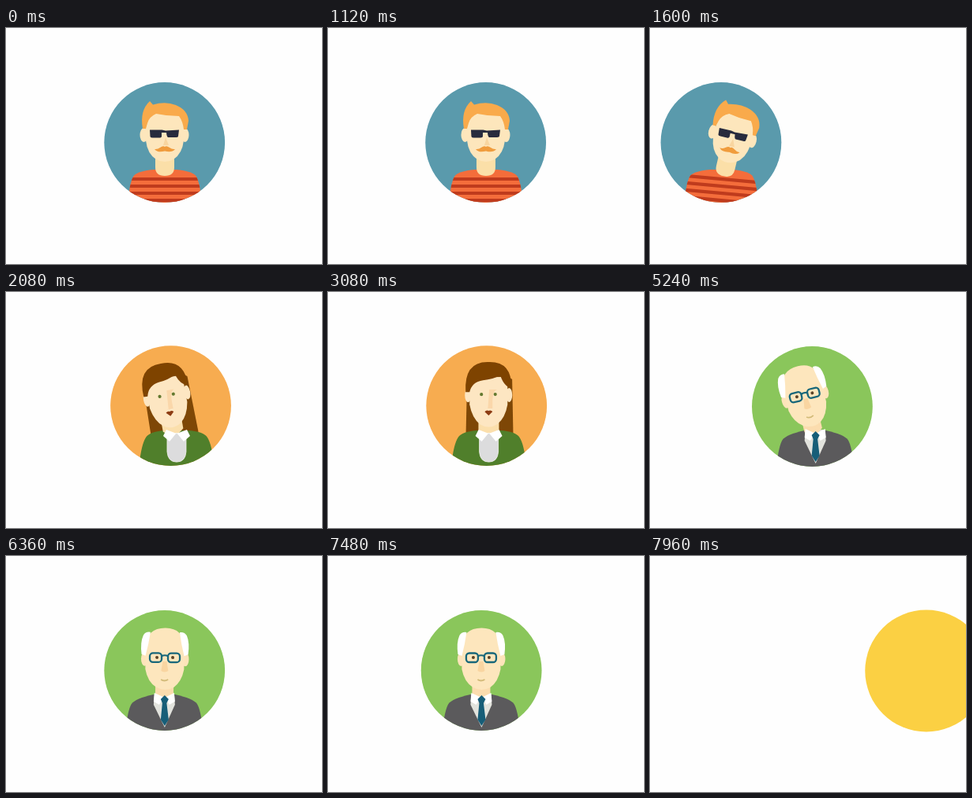
An HTML page that plays this animation: 400 by 300 pixels, repeating every 8 s.

```html
<!DOCTYPE html>
<html lang="en">
<head>
<meta charset="utf-8">
<title>Portraits</title>
<style>
  html, body { margin: 0; width: 100%; height: 100%; overflow: hidden; background: #fefefe; }
  svg { display: block; width: 100vw; height: 100vh; }
</style>
</head>
<body>
<svg viewBox="0 0 400 300" xmlns="http://www.w3.org/2000/svg">
  <defs>
    <clipPath id="disc"><circle cx="200.7" cy="145.5" r="76.4"/></clipPath>
    <clipPath id="shirt"><path d="M187 180Q165 182 161 189Q156 198 154 225H248Q246 198 241 189Q237 182 215 180Z"/></clipPath>
  </defs>

  <g class="card" data-lean="13" data-pivot="201" clip-path="url(#disc)">
    <circle cx="200.7" cy="145.5" r="77" fill="#5a9aac"/>
    <g class="person">
      <g clip-path="url(#shirt)">
        <rect x="140" y="175" width="120" height="60" fill="#f46d3b"/>
        <path class="stripes" d="M130 192H270M130 201H270M130 210H270M130 219H270" stroke="#bf3b1d" stroke-width="4.2"/>
      </g>
      <g class="head">
        <path d="M189 160H213V177Q213 188 201 188Q189 188 189 177Z" fill="#fbdfa8"/>
        <ellipse cx="174.500" cy="136" rx="5" ry="9" fill="#fde6bc"/>
        <ellipse cx="226.500" cy="136" rx="5" ry="9" fill="#fde6bc"/>
        <path d="M177 106H225V143Q223 160 212 167Q201 173 190 167Q179 160 177 143Z" fill="#fde6bc"/>
        <path d="M173 128Q169 105 182 93L186 97.500Q202 93 215 98Q230 104 231 118L229 129H225Q224 119 219 112Q204 112 190 109Q181 113 179 121L177 128Z" fill="#f9aa4b"/>
        <path d="M202 139L206 149H199" fill="#f8d59f"/>
        <path d="M182 129.500H197.500L202 130.500L219 129.500L218 137.500Q218 139 215 139H205.500Q203.500 139 203 133H197V137.500Q197 139.500 194 139.500H185.500Q183 139.500 182.500 138Z" fill="#272b3d"/>
        <path d="M188 154Q192 154.500 195 152Q199 149 201 151Q203 149 207 152Q210 154.500 214 154Q210 159 201 156.500Q192 159 188 154Z" fill="#f09c3d"/>
      </g>
    </g>
  </g>

  <g class="card" data-lean="11" data-pivot="200" data-y="-0.9" clip-path="url(#disc)">
    <circle cx="200.7" cy="145.5" r="77" fill="#f7ac50"/>
    <g class="person" data-x="2.5">
      <g class="head">
        <path d="M174 112Q201 88 231 112L232 184H172Z" fill="#7e4706"/>
      </g>
      <path d="M187 177Q167 178 162 186Q156 195 153 226H249Q246 195 240 186Q235 178 215 177Z" fill="#507f2b"/>
      <g class="head">
        <path d="M188 158H214V176L201 186L188 176Z" fill="#fbdfac"/>
        <ellipse cx="175" cy="132" rx="4" ry="9" fill="#fde6c2"/>
        <ellipse cx="227" cy="132" rx="4" ry="9" fill="#fde6c2"/>
        <path d="M177 109H225V144Q222 161 212 169Q201 176 190 169Q180 161 177 144Z" fill="#fde6c2"/>
        <path d="M202 125H212Q206 126 206 141V149H200" fill="#fad7aa"/>
        <path d="M172 128Q170 89 201 90Q231 89 230 123Q221 122 216 107Q207 112 194 113Q180 115 177 128Z" fill="#7e4300"/>
        <circle cx="192" cy="131" r="2.100" fill="#63792f"/>
        <circle cx="209.500" cy="131" r="2.100" fill="#63792f"/>
        <path d="M196 153Q198.500 150.500 201 152Q203.500 150.500 206 153L201 158Z" fill="#8d3c13"/>
      </g>
      <path d="M189 184Q201 177 213 184V204Q212 217 201 217Q190 217 189 204Z" fill="#dcdcdd" stroke="#f1f1ee" stroke-width="0.800"/>
      <path d="M188 176L201 181L214 176L218 184L210 191L201 180L192 191L184 184Z" fill="#fff"/>
    </g>
  </g>

  <g class="card" data-lean="14" data-pivot="185" clip-path="url(#disc)">
    <circle cx="200.7" cy="145.5" r="77" fill="#8ac65b"/>
    <g class="person">
      <path d="M187 176Q164 181 159 188Q154 196 151 225H250Q247 196 242 188Q237 181 214 176Z" fill="#5b5a5c"/>
      <path d="M188 175H213L214 189L201 218L187 189Z" fill="#e2e3dd"/>
      <g class="head">
        <path d="M189 158H212V175L201 183L189 175Z" fill="#fbdcae"/>
        <ellipse cx="175" cy="131" rx="4.500" ry="9" fill="#fde4ba"/>
        <ellipse cx="226.500" cy="131" rx="4.500" ry="9" fill="#fde4ba"/>
        <path d="M176 116Q177 91.500 201 91.500Q224 91.500 225 116V144Q222 160 212 167Q201 173 190 167Q179 160 176 144Z" fill="#fde6bd"/>
        <path d="M182 97Q176 96 173 101Q169 110 171 125L176 127Q180 112 182 97ZM219 97Q225 96 228 101Q232 110 230 125L225 127Q221 112 219 97Z" fill="#fff"/>
        <path d="M198 134H203L205 146Q201 149 196 146Z" fill="#f9d5a1"/>
        <circle cx="190.500" cy="129" r="2" fill="#5b4327"/>
        <circle cx="210.500" cy="129" r="2" fill="#5b4327"/>
        <path d="M196 127.500Q200.500 125 205 127.500" fill="none" stroke="#17677a" stroke-width="2.200"/>
        <rect x="181.500" y="123.500" width="15" height="11.500" rx="4" fill="none" stroke="#17677a" stroke-width="2.300"/>
        <rect x="204.500" y="123.500" width="15" height="11.500" rx="4" fill="none" stroke="#17677a" stroke-width="2.300"/>
        <path d="M196 157Q200 160 205 157" fill="none" stroke="#d2ba78" stroke-width="1.800"/>
      </g>
      <path d="M188 174L201 180L213 174L214 185L207 189L201 179L194 189L187 185Z" fill="#fff"/>
      <path d="M201 177L206 182L203.500 187L206 208L201 216L196 208L198 187L196 182Z" fill="#175e78"/>
    </g>
  </g>

  <g class="card">
    <circle cx="200.7" cy="146" r="77.5" fill="#fbd043"/>
  </g>
</svg>
<script>
  const LOOP = 8000, STEP = 3120, FIRST = 1080;
  const cards = [...document.querySelectorAll('.card')].map(el => ({
    el,
    lean: +el.dataset.lean,
    pivot: +el.dataset.pivot,
    y: +el.dataset.y || 0,
    person: el.querySelector('.person'),
    heads: el.querySelectorAll('.head'),
    stripes: el.querySelectorAll('.stripes')
  }));

  const move = (el, x, y = 0) => el.setAttribute('transform', `translate(${x.toFixed(2)} ${y})`);
  const turn = (els, deg, y) =>
    els.forEach(el => el.setAttribute('transform', `rotate(${deg.toFixed(2)} 201 ${y})`));
  const after = (t, start) => Math.max(0, t - start);

  // Distance still to go, r ms after the change began
  function enter(r) {
    const x = 8 * (after(1332, r) / 332.6) ** 4 + 0.004 * after(640, r) ** 2;
    return Math.min(600, x);
  }

  // Distance already left behind
  function leave(r) {
    if (r <= 0) return 0;
    const x = 3.3 * (Math.exp(0.0068 * Math.min(r, 900)) - 1) + 0.0033 * after(r, 520) ** 2;
    return Math.min(600, x);
  }

  // Damped sway after arrival
  function sway(r) {
    if (r < 640) return -1;
    return Math.exp(-after(r, 1040) / 400) * Math.cos((r - 1040) / 800 * 2 * Math.PI);
  }

  function draw(t) {
    cards.forEach((c, i) => {
      const rIn = t - FIRST - STEP * (i - 1);
      const rOut = rIn - STEP;
      const gap = enter(rIn), swing = sway(rIn);
      move(c.el, gap - leave(rOut), c.y);
      if (!c.person) return;
      const push = Math.min(1.25, (after(rOut, 200) / 320) ** 1.5);
      const tilt = c.lean * (push - swing);
      move(c.person, (+c.person.dataset.x || 0) + 0.25 * gap + 2.8 * swing);
      turn(c.heads, tilt, c.pivot);
      turn(c.stripes, tilt * 0.4, 200);
    });
  }

  function tick() {
    draw(performance.now() % LOOP);
    requestAnimationFrame(tick);
  }
  tick();
</script>
</body>
</html>
```
